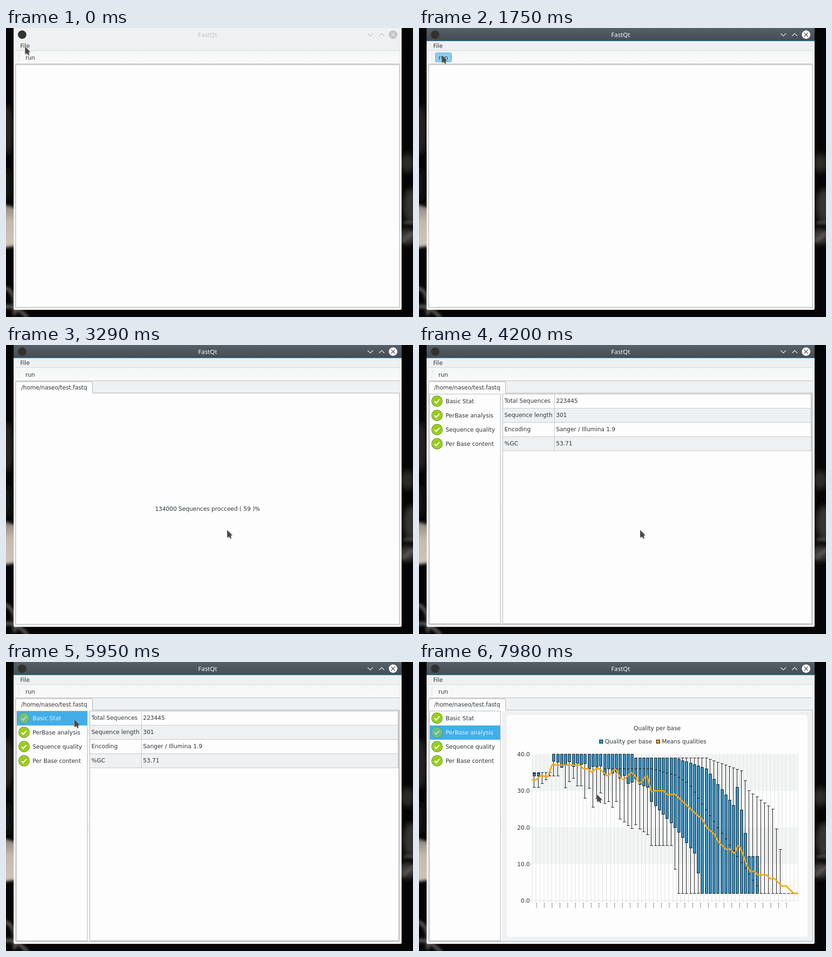
These frames come from a looping animation (858 px wide and 610 px high, 8 s). An HTML page:

```html
<!DOCTYPE html>
<html lang="en">
<head>
<meta charset="utf-8">
<title>FastQt</title>
<style>
html, body { margin: 0; width: 100%; height: 100%; overflow: hidden; background: #050505; }
svg { display: block; width: 858px; height: 610px; }
text { font: 12px "DejaVu Sans", sans-serif; fill: #31363b; white-space: pre; }
.title { font: 13px "Noto Sans", sans-serif; }
.mid { text-anchor: middle; }
.end { text-anchor: end; }
.crisp { shape-rendering: crispEdges; }
</style>
</head>
<body>
<svg id="stage" viewBox="0 0 858 610">
  <defs>
    <linearGradient id="bar" x2="0" y2="1"><stop stop-color="#566068"/><stop offset="1" stop-color="#444d54"/></linearGradient>
    <linearGradient id="tools" x2="0" y2="1"><stop stop-color="#f5f6f6"/><stop offset="1" stop-color="#f9f9f9"/></linearGradient>
    <linearGradient id="lamp" x2="0" y2="1"><stop stop-color="#8a8178"/><stop offset=".4" stop-color="#c4b9ac"/><stop offset="1" stop-color="#cfc5b9"/></linearGradient>
    <filter id="soft" x="-100%" y="-100%" width="300%" height="300%"><feGaussianBlur stdDeviation="6"/></filter>
    <filter id="blur" x="-100%" y="-100%" width="300%" height="300%"><feGaussianBlur stdDeviation="3"/></filter>
    <g id="tick">
      <circle r="11" fill="#98cc0b" stroke="#5f9a12" stroke-width="1.4"/>
      <circle r="9.6" fill="none" stroke="#c3e56b"/>
      <path d="M-5 0.5L-1.6 4L5 -3.5" fill="none" stroke="#fff" stroke-width="2.6"/>
    </g>
    <path id="arrows" d="M762.5 11.5L768 17L773.5 11.5M786.5 17L792 11.5L797.5 17" fill="none" stroke-width="1.2"/>
    <path id="cross" d="M812 10L820 18M820 10L812 18" stroke-width="1.3"/>
  </defs>

  <rect width="858" height="610" fill="#050505"/>
  <g filter="url(#soft)">
    <ellipse cx="2" cy="215" rx="15" ry="52" fill="#252422"/>
    <ellipse cx="2" cy="330" rx="9" ry="36" fill="#151412"/>
    <ellipse cx="846" cy="285" rx="16" ry="20" fill="#2b2928"/>
    <ellipse cx="854" cy="375" rx="17" ry="36" fill="#363432"/>
    <ellipse cx="846" cy="440" rx="20" ry="16" fill="#403e3c"/>
  </g>
  <g filter="url(#blur)">
    <path d="M-9 371L22 380V460L-9 464Z" fill="url(#lamp)"/>
    <path d="M-6 548Q24 552 18 606M-6 590Q16 580 46 612" fill="none" stroke="#6b6863" stroke-width="6"/>
    <path d="M836 452Q850 436 862 430M838 412Q850 408 862 412" fill="none" stroke="#6b6863" stroke-width="4"/>
  </g>

  <path d="M16 0H834V592Q834 595 831 595H19Q16 595 16 592Z" fill="#eff0f1"/>
  <use href="#arrows" stroke="#bdc3c7"/>
  <circle cx="816" cy="14" r="9" fill="#bdc3c7"/>
  <use href="#cross" stroke="#eff0f1"/>
  <text class="title mid" x="425" y="19" style="fill:#bdc3c7">FastQt</text>
  <g id="active">
    <path d="M16 0H834V27H16Z" fill="url(#bar)"/>
    <path class="crisp" d="M16 27.5H834" stroke="#3daee9"/>
    <use href="#arrows" stroke="#fcfcfc"/>
    <circle cx="816" cy="14" r="9" fill="#fcfcfc"/>
    <use href="#cross" stroke="#475057"/>
    <text class="title mid" x="425" y="19" style="fill:#fcfcfc">FastQt</text>
  </g>
  <circle cx="34" cy="14" r="9" fill="#33322f"/>

  <path d="M20 48H830V75H20Z" fill="url(#tools)"/>
  <path class="crisp" d="M20 47.5H830" stroke="#d3d5d7"/>
  <path class="crisp" d="M20 75.5H830" stroke="#b4b7b9"/>
  <path class="crisp" d="M25.5 54V71M28.5 54V71" stroke="#c0c3c5" stroke-dasharray="1 2"/>
  <rect id="fileHot" x="26" y="29" width="29" height="19" fill="#3daee9"/>
  <text id="file" x="30" y="42">File</text>
  <rect id="runHot" x="34.5" y="52.5" width="34" height="19" rx="2" stroke="#3daee9"/>
  <text x="41" y="67">run</text>

  <path id="blank" class="crisp" d="M20.5 77.5H829.5V589.5H20.5Z" fill="#fdfdfd" stroke="#a9acae"/>
  <g id="tab">
    <path d="M20.5 101.5H829.5V589.5H20.5Z" fill="#fdfdfd" stroke="#a9acae"/>
    <path d="M20.5 102V80Q20.5 77.5 23 77.5H180Q182.5 77.5 182.5 80V101.5" fill="#fdfdfd" stroke="#a9acae"/>
    <path d="M21 101.5H182" stroke="#fdfdfd"/>
    <text x="32" y="94">/home/naseo/test.fastq</text>
  </g>
  <text id="progress" class="mid" x="425" y="350"></text>

  <g id="results">
    <path d="M22 103H828V589H22Z" fill="#eff0f1"/>
    <path d="M172 103H176V589H172Z" fill="#f8f8f8"/>
    <path class="crisp" d="M22.5 103.5H171.5V588.5H22.5Z" fill="#fdfdfd" stroke="#b0b3b5"/>
    <path class="crisp" d="M173.5 339V356" stroke="#b5b8ba" stroke-dasharray="1 2"/>
    <rect id="select" x="23" width="148" height="30" fill="#41aeea"/>
    <g id="list"></g>
    <g id="table"></g>
    <g id="chart"></g>
  </g>

  <g id="menu">
    <path class="crisp" d="M26.5 48.5H216.5V91.5H26.5Z" fill="#fcfcfc" stroke="#939799"/>
    <text x="53" y="63">Open file</text><text x="159" y="63">Ctrl+O</text>
    <text x="53" y="85">Close</text><text x="159" y="85">Ctrl+W</text>
  </g>
  <g id="cursor">
    <path d="M1 2V19L4.5 16L7 20.5L10 19L8.5 14L12.5 13Z" fill="#000" opacity=".18"/>
    <path d="M0 0V16.8L3.8 14.6L7.5 18.8L9 17.5L8 12.6L11 11Z" fill="#4a4a4b" stroke="#fff" stroke-opacity=".55" stroke-width=".6"/>
  </g>
</svg>
<script>
const $ = id => document.getElementById(id);
const clamp = v => Math.max(0, Math.min(1, v));
const show = (id, on) => { $(id).style.display = on ? '' : 'none'; };
const label = (x, y, s, cls = '') => `<text x="${x}" y="${y}" class="${cls}">${s}</text>`;
const path = (d, stroke, extra = '') => `<path d="${d}" fill="none" stroke="${stroke}" ${extra}/>`;
const box = (x, y, w, h, fill, extra = '') =>
  `<rect x="${x}" y="${y}" width="${w}" height="${h}" fill="${fill}" ${extra}/>`;

// Linear interpolation through [position, ...values] keys, held at both ends.
function along(keys, at) {
  const i = keys.findIndex(k => k[0] > at);
  if (i < 1) return keys.at(i).slice(1);
  const [a, b] = [keys[i - 1], keys[i]];
  const f = (at - a[0]) / (b[0] - a[0]);
  return a.slice(1).map((v, j) => v + (b[j + 1] - v) * f);
}

let seed = 7;
const noise = () => (seed = seed * 16807 % 2147483647) / 1073741823.5 - 1;

$('list').innerHTML = ['Basic Stat', 'PerBase analysis', 'Sequence quality', 'Per Base content']
  .map((s, i) => `<g><use href="#tick" x="38" y="${118.5 + 30 * i}"/>${label(56, 123 + 30 * i, s)}</g>`).join('');

$('table').innerHTML = box(176.5, 103.5, 651, 485, '#fdfdfd', 'class="crisp" stroke="#a9acae"') +
  [['Total Sequences', '223445'], ['Sequence length', '301'], ['Encoding', 'Sanger / Illumina 1.9'], ['%GC', '53.71']]
    .map(([k, v], i) => {
      const y = 104 + 30 * i;
      return box(178, y, 648, 29, i % 2 ? '#eff0f1' : '#fdfdfd') +
        path(`M177 ${y + 29.5}H827M285.5 ${y}V${y + 30}M826.5 ${y}V${y + 30}`, '#c1c4c6', 'class="crisp"') +
        label(180, y + 18, k) + label(289, y + 18, v);
    }).join('');

// Trend of each chart statistic: bin, quality.
const MEAN = [[0, 33], [4, 34], [5, 37.4], [10, 37], [16, 35.6], [29, 33], [30, 30], [36, 29], [42, 23],
  [48, 15], [51, 13], [52, 15], [55, 8], [61, 6], [66, 2]];
const HIGH = [[0, 35], [4, 35], [5, 40], [25, 40], [26, 39], [44, 39], [53, 35.5], [55, 30], [61, 25], [63, 14], [64, 2]];
const TOP = [[0, 35], [4, 35], [5, 40], [25, 40], [26, 39], [36, 39], [44, 36], [51, 26], [52, 31], [55, 12], [57, 12], [58, 2]];
const BOTTOM = [[1, 34], [2, 35], [4, 35], [5, 38], [16, 36], [29, 31], [30, 27], [36, 20], [41, 13], [43, 2]];
const LOW = [[1, 31], [4, 34], [6, 34], [16, 28], [29, 18], [30, 15], [35, 15], [37, 2]];

const BINS = 68, LEFT = 238.7, RIGHT = 798.6, STEP = (RIGHT - LEFT) / BINS;
const BLUE = '#2a9bdb', ORANGE = '#f6a60a';
const py = v => 503.5 - v * 7.725;
const row = v => Math.floor(py(v)) + 0.5;

function mean(i) {
  const wave = i > 13 && i < 30 ? 0.9 * Math.cos((i - 21) * Math.PI / 2) : 0;
  return Math.round(along(MEAN, i)[0]) + wave;
}

function candle(i) {
  const [high, top, bottom, low] = [HIGH, TOP, BOTTOM, LOW].map(keys => along(keys, i)[0]);
  const rough = i > 6 && i < 27;
  const q1 = Math.min(top, bottom + (rough ? 1.3 * noise() : 0));
  const min = Math.min(q1, low + (rough ? 3.5 * noise() : 0));
  const mid = Math.max(q1, Math.min(top - 0.25 * (top - q1), 36 - 1.6 * Math.max(0, i - 37)));
  const x = Math.floor(LEFT + STEP * (i + 0.5)) + 0.5;
  const cap = v => `M${x - 2.5} ${row(v)}h6`;
  const whisker = path(`M${x} ${row(high)}V${row(min)}${cap(high)}${cap(min)}`, '#000');
  if (top - q1 < 0.1) return whisker;
  return whisker + box(x - 2, row(top), 5, row(q1) - row(top), BLUE, 'stroke="#000"') +
    path(`M${x - 2} ${row(mid)}h5`, '#000');
}

function spline(points) {
  const p = i => points[Math.max(0, Math.min(points.length - 1, i))];
  let d = 'M' + points[0];
  for (let i = 0; i < points.length - 1; i++) {
    const [a, b, c, e] = [p(i - 1), p(i), p(i + 1), p(i + 2)];
    d += `C${b.map((v, j) => v + (c[j] - a[j]) / 6)} ${c.map((v, j) => v - (e[j] - b[j]) / 6)} ${c}`;
  }
  return d;
}

function drawChart() {
  let s = box(185, 112, 634, 468, '#fdfdfd', 'rx="5"') +
    label(502, 144, 'Quality per base', 'mid') +
    box(380.5, 164.5, 7, 7, BLUE, 'stroke="#000"') + label(392, 172, 'Quality per base') +
    box(500.5, 164.5, 7, 7, ORANGE, 'stroke="#000"') + label(512, 172, 'Means qualities') +
    [40, 20].map(v => box(LEFT, py(v), RIGHT - LEFT, 77.25, '#f3f5f4')).join('');
  let grid = '', dots = '';
  for (let i = 0; i <= BINS; i++) {
    const x = LEFT + i * STEP;
    grid += `M${x} 194V508`;
    if (i % 2 && i < 66) dots += `M${x + 0.7} 509v9`;
  }
  for (let v = 0; v <= 40; v += 10) {
    grid += `M${LEFT - 5} ${row(v)}H${v ? LEFT : RIGHT}`;
    s += label(233.7, Math.round(py(v) + 4.5), v.toFixed(1), 'end');
  }
  const bins = [...Array(BINS).keys()];
  const line = bins.map(i => [LEFT + i * (RIGHT - LEFT) / (BINS - 1), py(mean(i))]);
  $('chart').innerHTML = s + path(grid, '#dfe1e2', 'class="crisp"') +
    path(dots, '#555', 'stroke-width="1.5" stroke-dasharray="1.8 1.8"') +
    `<g class="crisp">${bins.map(candle).join('')}</g>` +
    path(spline(line), ORANGE, 'stroke-width="3" stroke-linecap="round"');
}
drawChart();

// Pointer stops: time, x, y.
const TRACK = [
  [560, 40, 39], [700, 40, 48], [840, 40, 39], [1400, 48, 57], [2030, 48, 57], [2450, 206, 231],
  [2870, 450, 382], [3080, 466, 390], [4270, 466, 390], [5040, 122, 69], [5670, 98, 112], [5810, 98, 112],
  [6230, 237, 140], [6580, 83, 153], [6930, 88, 143], [7560, 88, 143], [7980, 375, 279]
];
const LOOP = 8000, TICK = 70, TOTAL = 223445;

// The counter refreshes every 105 ms, out of step with the ticks.
function progress(t) {
  const n = 1000 * Math.round(11.2 * Math.max(0, Math.floor((t - 20) / 105) - 19));
  return `${n} Sequences procceed ( ${Math.floor(100 * n / TOTAL)} )%`;
}

function render(now) {
  const t = Math.floor(now % LOOP / TICK) * TICK;
  const menuOn = t >= 210 && t < 840;
  $('active').style.opacity = clamp((t - 70) / 420);
  $('menu').style.opacity = t < 840 ? clamp((t - 140) / 280) : clamp(1 - (t - 840) / 280);
  show('fileHot', menuOn);
  $('file').style.fill = menuOn ? '#fcfcfc' : '';
  show('runHot', t >= 1330 && t < 2170);
  $('runHot').setAttribute('fill', t >= 1750 && t < 1960 ? '#8fcdee' : 'none');

  show('blank', t < 1960);
  show('tab', t >= 1960);
  show('progress', t >= 1960 && t < 4200);
  $('progress').textContent = progress(t);
  show('results', t >= 4200);
  show('table', t < 7280);
  show('chart', t >= 7280);

  const picked = t < 5670 ? -1 : t < 7280 ? 0 : 1;
  show('select', picked >= 0);
  $('select').setAttribute('y', 104 + 30 * picked);
  [...$('list').children].forEach((g, i) => {
    g.firstChild.style.opacity = i === picked ? 0.55 : 1;
    g.lastChild.style.fill = i === picked ? '#e4f3fc' : '';
  });
  $('cursor').setAttribute('transform', `translate(${along(TRACK, t).map(Math.round)})`);
}

const start = performance.now();
function frame() {
  render(performance.now() - start);
  requestAnimationFrame(frame);
}
frame();
</script>
</body>
</html>
```
